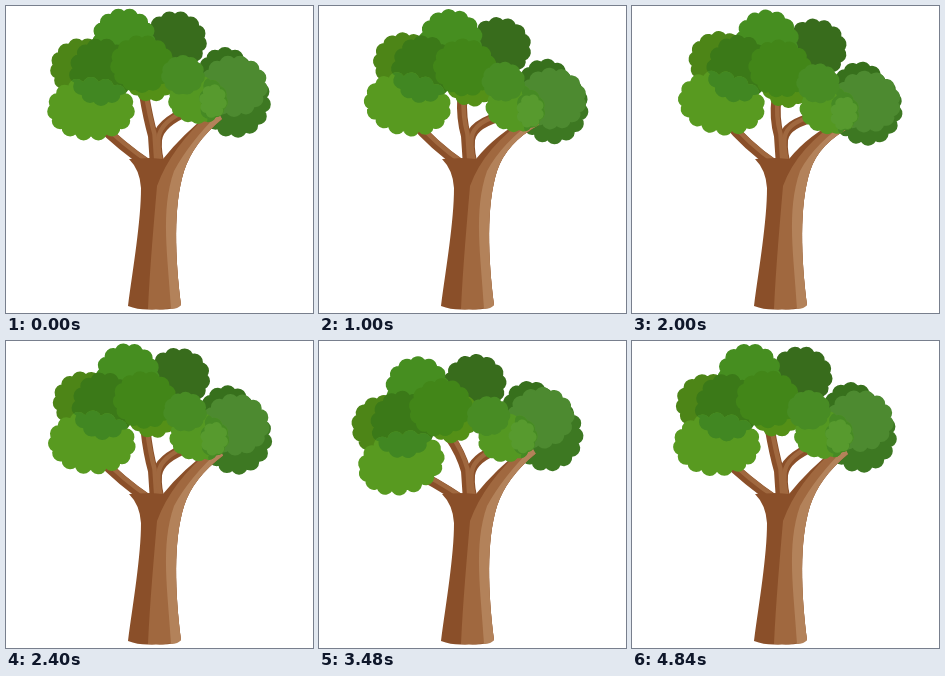
These frames come from a looping animation (307x307 px, 5000 ms). An HTML page with a canvas:

```html
<!DOCTYPE html>
<html>
<head>
<meta charset="utf-8">
<style>
  html, body { margin: 0; height: 100%; overflow: hidden; background: #fff; }
  canvas { display: block; width: 100vmin; height: 100vmin; }
</style>
</head>
<body>
<canvas id="stage" width="307" height="307"></canvas>
<script>
const ctx = document.getElementById('stage').getContext('2d');
const LOOP = 5000, STEP = 40, LAST = 4840;

// Pivot, turn in radians, sideways shift and dip at full sway.
const crown = { x: 142, y: 122, turn: 0.234, shift: 0, dip: 5.6 };
const twig = { x: 165, y: 122, turn: 0.18, shift: 2, dip: 7.5 };
const side = { x: 150, y: 150, turn: 0.07, shift: 3.5, dip: 4 };

const clump = (group, x, y, rx, ry, bumps, color) => ({ group, x, y, rx, ry, bumps, color });

const farTop = clump(twig, 219, 67, 27, 26, 11, '#37701c');
const far = clump(side, 229, 95, 36, 37, 14, '#3d7822');
const pale = clump(twig, 228, 80, 34, 31, 13, '#4d8a30');
const peak = clump(twig, 169, 35, 32, 30, 13, '#386c1c');
const leftOuter = clump(crown, 76, 62, 32, 30, 13, '#4d8517');
const upper = clump(crown, 118, 33, 32, 31, 13, '#468e20');
const leftInner = clump(crown, 95, 66, 32, 34, 13, '#3b7918');
const under = clump(crown, 145, 69, 27, 27, 11, '#549017');
const center = clump(crown, 136, 58, 32, 29, 13, '#428618');
const leftLow = clump(crown, 85, 103, 44, 32, 15, '#589a20');
const rightLow = clump(twig, 192, 94, 30, 24, 13, '#549822');
const rightMid = clump(twig, 177, 69, 22, 20, 11, '#488c24');
const glow = clump(twig, 207, 95, 14, 17, 8, '#579a2e');

const ease = p => (1 - Math.cos(Math.PI * p)) / 2;

// Rest, right, left, rest: three equal eased legs.
function swayAt(t) {
  const keys = [0, 1, -1, 0], pos = t / LOOP * 3, leg = Math.floor(pos);
  return keys[leg] + (keys[leg + 1] - keys[leg]) * ease(pos - leg);
}

function move(g, x, y, u) {
  const a = g.turn * u, c = Math.cos(a), s = Math.sin(a);
  const dx = x - g.x, dy = y - g.y, lean = Math.abs(u);
  return [
    g.x + dx * c - dy * s + g.shift * lean,
    g.y + dx * s + dy * c + g.dip * lean
  ];
}

function outline({ group, x, y, rx, ry, bumps }, u) {
  const b = Math.min(8.5, rx * 0.4, ry * 0.4);
  const local = new Path2D(), placed = new Path2D();
  local.ellipse(0, 0, rx - b * 0.5, ry - b * 0.5, 0, 0, Math.PI * 2);
  for (let i = 0; i < bumps; i++) {
    const a = (i + 0.25) / bumps * Math.PI * 2;
    const px = Math.cos(a) * (rx - b), py = Math.sin(a) * (ry - b);
    local.moveTo(px + b, py);
    local.arc(px, py, b, 0, Math.PI * 2);
  }
  const turn = group.turn * u * 180 / Math.PI;
  placed.addPath(local, new DOMMatrix().translate(...move(group, x, y, u)).rotate(turn));
  return placed;
}

function leaves(u, ...clumps) {
  for (const c of clumps) {
    ctx.fillStyle = c.color;
    ctx.fill(outline(c, u));
  }
}

function overlap(u, a, b, color) {
  ctx.save();
  ctx.clip(outline(a, u));
  ctx.fillStyle = color;
  ctx.fill(outline(b, u));
  ctx.restore();
}

function stroke(d, width, color) {
  ctx.lineWidth = width;
  ctx.strokeStyle = color;
  ctx.stroke(new Path2D(d));
}

function fill(d, color) {
  ctx.fillStyle = color;
  ctx.fill(new Path2D(d));
}

function wood(u) {
  const left = move(crown, 92, 117, u * 0.75), mid = move(crown, 138, 88, u);
  const shoot = move(side, 182, 105, u);
  const top = move(side, 206, 105, u), low = move(side, 216, 113, u);
  const edge = move(side, 213, 107, u);
  const dark = '#8a4f29', tan = '#a0683f', light = '#b3825a';
  const limbs = [
    `M${left} Q115,140 143,159`,
    `M${mid} Q142,112 147,130 L149,160`,
    `M${shoot} Q153,117 151,134 Q150,148 155,162`
  ];
  const right = `${low} Q187,137 178,165 C167,200 169,252 175,299`;
  ctx.lineCap = 'round';
  limbs.forEach(d => stroke(d, 10, dark));
  ctx.save();
  ctx.translate(1.5, -2);
  limbs.forEach(d => stroke(d, 4.5, tan));
  ctx.restore();
  fill(`M122,300 C127,262 135,215 135,182 Q134,164 123,153 L145,152 L157,153
    Q176,129 ${top} L${right} Q164,305 150,303 Q135,305 122,300Z`, dark);
  fill(`M142,303 C144,260 148,215 151,180 Q165,141 ${top} L${right}
    Q160,305 142,303Z`, tan);
  fill(`M165,303 C162,250 154,205 168,165 Q183,137 ${edge} L${right}
    Q172,303 165,303Z`, light);
}

function draw(time) {
  const t = Math.min(Math.floor(time % LOOP / STEP) * STEP, LAST);
  const u = swayAt(t);
  ctx.fillStyle = '#fff';
  ctx.fillRect(0, 0, 307, 307);
  leaves(u, farTop, far, pale);
  wood(u);
  leaves(u, peak, leftOuter, upper, leftInner, under, center, leftLow);
  overlap(u, leftInner, leftLow, '#418722');
  leaves(u, rightLow);
  overlap(u, far, rightLow, '#468a24');
  leaves(u, rightMid, glow);
}

let start;
function tick(now) {
  start ??= now;
  draw(now - start);
  requestAnimationFrame(tick);
}
draw(0);
requestAnimationFrame(tick);
</script>
</body>
</html>
```
